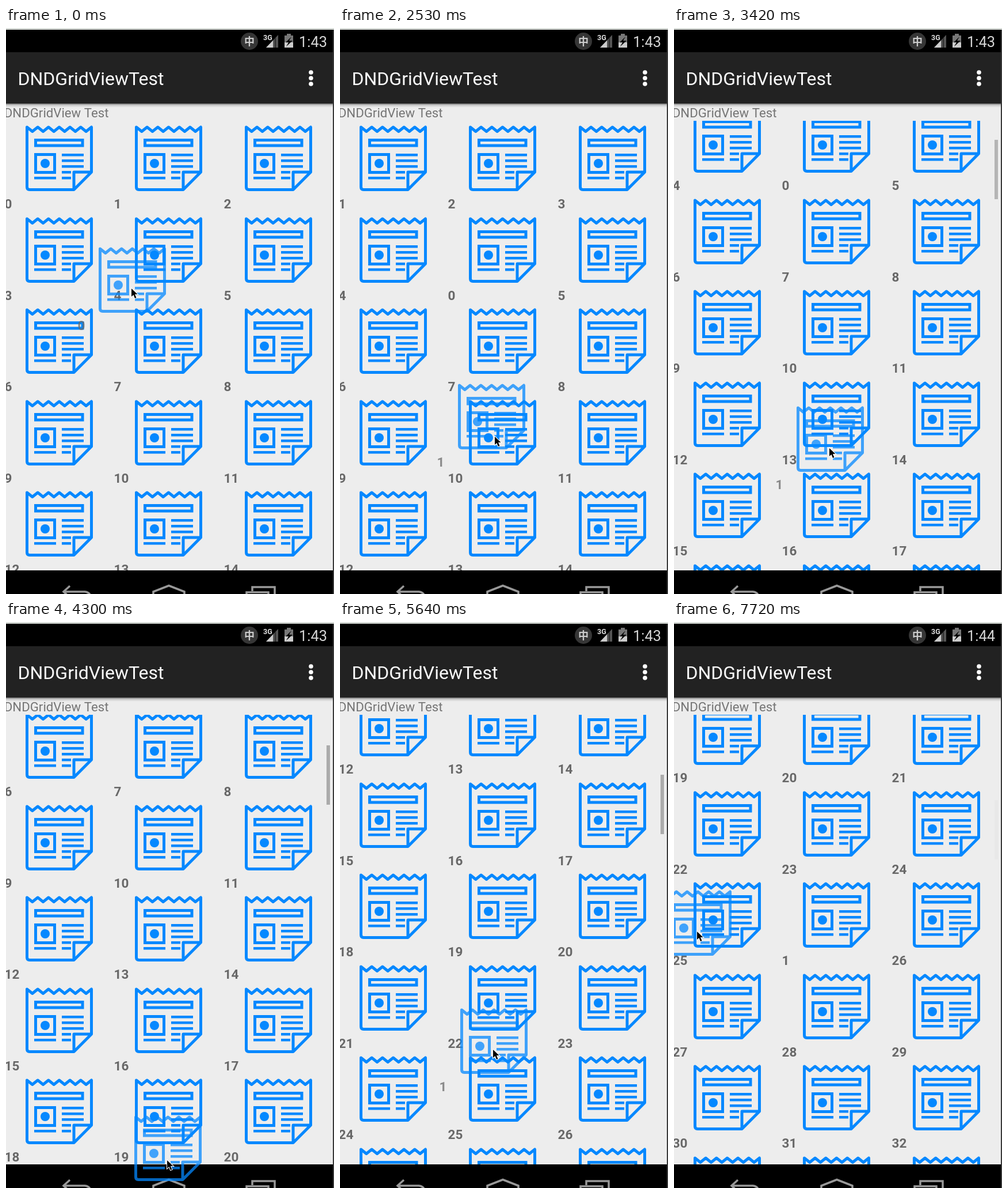
These frames come from a looping animation (570x982 px, 8 s). An HTML page with a canvas:

```html
<!DOCTYPE html>
<html lang="en">
<head>
<meta charset="utf-8">
<title>DNDGridViewTest</title>
<style>
  html, body { margin: 0; width: 100%; height: 100%; overflow: hidden; background: #000; }
  canvas { display: block; }
</style>
</head>
<body>
<canvas id="stage" width="570" height="982"></canvas>
<script>
const ctx = document.getElementById('stage').getContext('2d');
const LOOP = 8000, TICK = 148.5;
const COL = 190.3, ROW = 158.5, GRID_TOP = 161, GRID_BOTTOM = 941;
const BLUE = '#0588ff', FONT = 'Roboto, sans-serif';
const FIRST_DROP = 6, SECOND_GRAB = 14, SECOND_DROP = 40, MINUTE_CHANGE = 41, THIRD_GRAB = 52;

const progress = (tick, from, to) => Math.min(1, Math.max(0, (tick - from) / (to - from)));
const easeOut = (tick, from, to, power) => 1 - (1 - progress(tick, from, to)) ** power;

// The pointer rests between glides.
const glides = [
  { from: 0, to: 2, x: 245, y: 474 },
  { from: 2, to: 4, x: 260, y: 417 },
  { from: 6, to: 9, x: 120, y: 259 },
  { from: 15, to: 17, x: 268, y: 708 },
  { from: 17, to: 29, x: 279, y: 933, power: 3.5 },
  { from: 32, to: 33, x: 265, y: 741 },
  { from: 42, to: 44, x: 261, y: 568 },
  { from: 47, to: 49, x: 39, y: 536 },
];

function pointerAt(tick) {
  let x = 217, y = 451;
  for (const glide of glides) {
    const k = progress(tick, glide.from, glide.to) ** (glide.power ?? 1);
    x += (glide.x - x) * k;
    y += (glide.y - y) * k;
  }
  return [x, y];
}

// Slow edge scrolling, faster while the pointer is below the list, then a fling.
function scrollAt(tick) {
  return 328 * easeOut(tick, 17, 29, 1.25) + 215 * progress(tick, 29, 33)
    + 197 * progress(tick, 33, SECOND_DROP) + 246 * easeOut(tick, 42, 47, 1.61);
}

function draggedLabel(tick) {
  if (tick < FIRST_DROP) return 0;
  if (tick >= SECOND_GRAB && tick < SECOND_DROP) return 1;
  return tick >= THIRD_GRAB ? 25 : null;
}

function itemOrder(tick) {
  const items = Array.from({ length: 48 }, (_, i) => i);
  const moveFirst = to => items.splice(to, 0, items.shift());
  if (tick >= FIRST_DROP) moveFirst(4);
  if (tick >= SECOND_DROP) moveFirst(25);
  return items;
}

function rect(x, y, w, h, fill) {
  ctx.fillStyle = fill;
  ctx.fillRect(x, y, w, h);
}

function disc(x, y, r, fill) {
  ctx.fillStyle = fill;
  ctx.beginPath();
  ctx.arc(x, y, r, 0, Math.PI * 2);
  ctx.fill();
}

function text(str, x, y, font, fill, family = FONT) {
  ctx.font = `${font} ${family}`;
  ctx.fillStyle = fill;
  ctx.fillText(str, x, y);
}

function strokePath(d, width, color) {
  ctx.lineWidth = width;
  ctx.strokeStyle = color;
  ctx.stroke(new Path2D(d));
}

function fillPath(d, color) {
  ctx.fillStyle = color;
  ctx.fill(new Path2D(d));
}

const TEETH = 6;
let pagePath = 'M36.5 172';
for (let i = 1; i <= TEETH * 2; i++) {
  pagePath += `L${36.5 + i * 56 / TEETH} ${i % 2 ? 179.5 : 172}`;
}
pagePath += 'V250L118 280.5H41Q36.5 280.5 36.5 276ZM118 280V250H148';

// Cell content uses the coordinates of the first cell.
function drawCell(x, y, label) {
  ctx.save();
  ctx.translate(Math.round(x), Math.round(y));
  ctx.lineJoin = 'round';
  strokePath(pagePath, 5, BLUE);
  ctx.lineJoin = 'miter';
  strokePath('M51.5 194.5H133V204H51.5ZM51.5 219.5H84.5V250.5H51.5Z', 5, BLUE);
  for (let i = 0; i < 5; i++) rect(97, 218 + i * 10, i < 3 ? 38 : 16, 4.5, BLUE);
  rect(49, 258, 38, 4.5, BLUE);
  disc(68, 235, 8, BLUE);
  text(label, -2.5, 313, 'bold 22.5px', '#686868');
  ctx.restore();
}

function drawGrid(tick) {
  const scroll = scrollAt(tick);
  const barAlpha = .28 * progress(tick, 17, 24) - .26 * progress(tick, 47, 49);
  ctx.save();
  ctx.beginPath();
  ctx.rect(0, GRID_TOP, 568, GRID_BOTTOM - GRID_TOP);
  ctx.clip();
  itemOrder(tick).forEach((label, i) => {
    const y = Math.floor(i / 3) * ROW - scroll;
    if (y > -160 && y < 790) drawCell(i % 3 * COL, y, label);
  });
  rect(557, Math.round(166.6 + scroll * .144), 6, 103, `rgba(0,0,0,${barAlpha})`);
  ctx.restore();
}

function drawStatusBar(tick) {
  rect(0, 0, 570, 3, '#d9ddd9');
  rect(0, 3, 570, 39, '#000');
  disc(423, 23, 15, '#363636');
  text('中', 414, 29.5, 'bold 18px', '#ccc', '"Noto Sans CJK SC", "Noto Sans CJK", sans-serif');
  fillPath('M452 34L473 12V34Z', '#555');
  fillPath('M452 34L464 21.5V34Z', '#ccc');
  strokePath('M468 17V34', 1.5, '#222');
  text('3G', 447, 21, 'bold 12.5px', '#ddd');
  fillPath('M488 10H495V13H499V34H484V13H488Z', '#777');
  rect(484, 25, 15, 9, '#ccc');
  fillPath('M496 15L486 25H491L487 32L498 22H492Z', '#000');
  text(tick >= MINUTE_CHANGE ? '1:44' : '1:43', 509, 33, '25.5px', '#d5d5d5');
}

function drawAppBar() {
  rect(0, 42, 570, 89, '#222');
  const shadow = ctx.createLinearGradient(0, 131, 0, 138);
  shadow.addColorStop(0, 'rgba(0,0,0,.55)');
  shadow.addColorStop(.4, 'rgba(0,0,0,.15)');
  shadow.addColorStop(1, 'rgba(0,0,0,0)');
  rect(0, 131, 570, 7, shadow);
  text('DNDGridViewTest', 20.5, 99, '32px', '#fafafa');
  for (let i = 0; i < 3; i++) disc(530, 77 + i * 10, 3.8, '#fff');
}

function drawNavBar() {
  rect(0, GRID_BOTTOM, 570, 41, '#000');
  strokePath('M111 968L100 978L111 988M100 978H137Q147 979 148 990', 3.5, '#999');
  strokePath('M256 990V978L283 967.5L310 978V990', 3.5, '#999');
  strokePath('M428 977V970H467V990M418 990V979H456V990', 3.5, '#999');
}

function drawPointer(tick) {
  const arrow = 'M1 1V15L4.5 12L7 18L9.5 17L7 11H11.5Z';
  ctx.save();
  ctx.translate(...pointerAt(tick));
  strokePath(arrow, 2, '#fff');
  fillPath(arrow, '#000');
  ctx.restore();
}

// The dragged copy trails slightly behind the pointer.
function drawDragged(tick) {
  const label = draggedLabel(tick);
  if (label === null) return;
  const [x, y] = pointerAt(tick - .09);
  ctx.globalAlpha = .75;
  drawCell(x - 90, y - 240, label);
  ctx.globalAlpha = 1;
}

function draw(now) {
  const tick = Math.floor((now % LOOP + 15) / TICK);
  rect(0, 0, 570, 982, '#ededed');
  drawGrid(tick);
  text('DNDGridView Test', -3.2, 155, '22.2px', '#757575');
  drawAppBar();
  drawStatusBar(tick);
  drawNavBar();
  rect(568, 3, 2, 979, '#3a3a3a');
  drawDragged(tick);
  drawPointer(tick);
}

let start;
function loop(now) {
  start ??= now;
  draw(now - start);
  requestAnimationFrame(loop);
}
requestAnimationFrame(loop);
</script>
</body>
</html>
```
